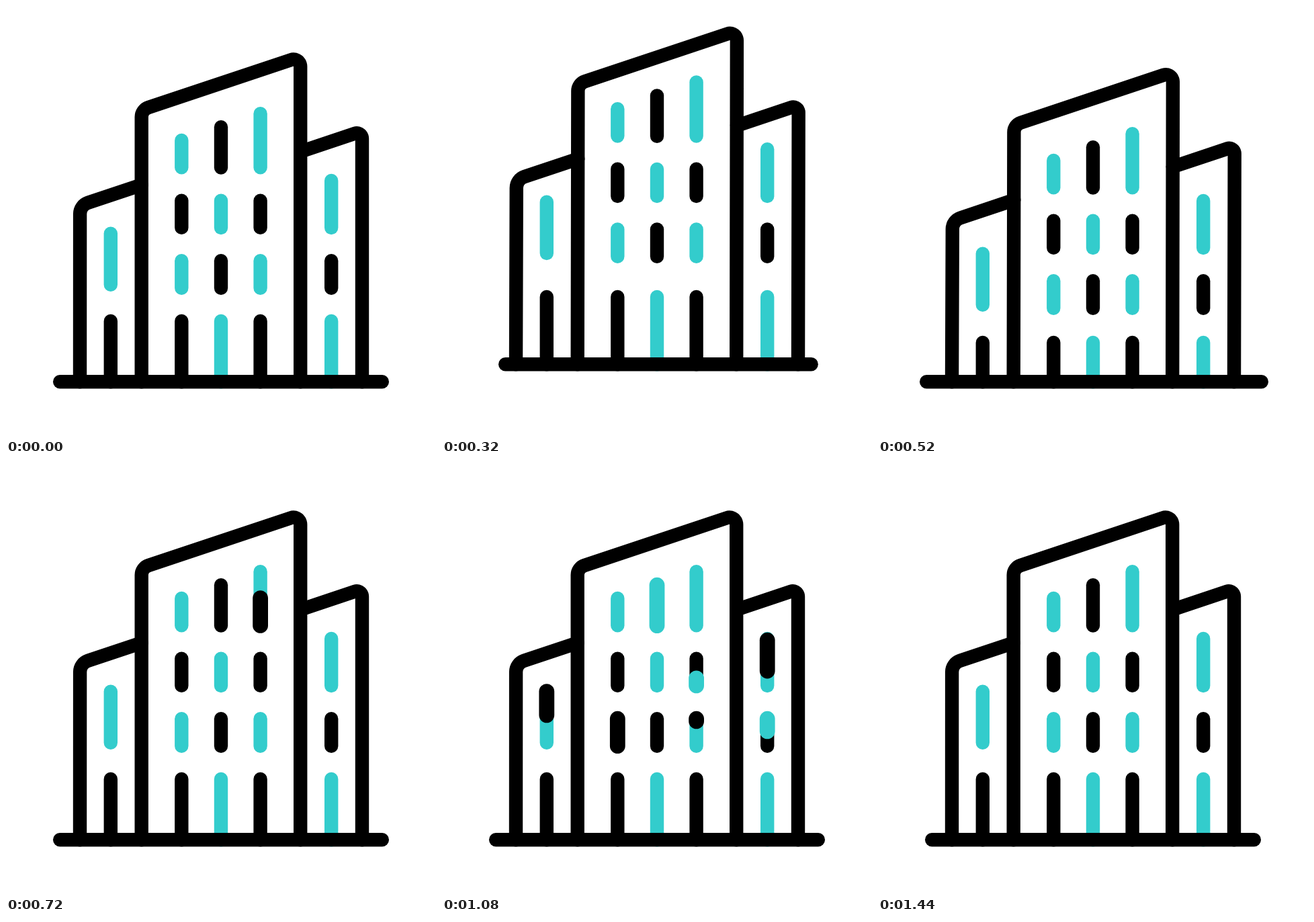
An HTML page with a canvas that plays this animation: 640 by 640 pixels, repeating every 1480 ms.

```html
<!DOCTYPE html>
<html lang="en">
<head>
<meta charset="utf-8">
<title>Office buildings</title>
<style>
  html, body { margin: 0; width: 100%; height: 100%; overflow: hidden; background: #fff; }
  canvas { display: block; width: 640px; height: 640px; }
</style>
</head>
<body>
<canvas id="stage" width="640" height="640"></canvas>
<script>
const LOOP = 1480, BLACK = '#000', TEAL = '#33cccc';
const LINE = 20.4, FLASH_LINE = 22.8;
const ctx = document.getElementById('stage').getContext('2d');

// Column centres, left to right
const [A, B, C, D, E] = [155.8, 261.3, 320, 378.6, 484.2];

// Windows: x, first and last centre y, colour
const windows = [
  [A, 338.6, 414.8, TEAL],
  [B, 200, 240.4, TEAL], [B, 289.6, 329.9, BLACK], [B, 379.2, 419.7, TEAL],
  [C, 180.2, 240.6, BLACK], [C, 289.8, 330, TEAL], [C, 379.2, 419.7, BLACK],
  [D, 160.2, 240.4, TEAL], [D, 289.6, 329.9, BLACK], [D, 379.2, 419.7, TEAL],
  [E, 260, 330, TEAL], [E, 379.2, 419.7, BLACK]
];
const doors = [[A, BLACK], [B, BLACK], [C, TEAL], [D, BLACK], [E, TEAL]];

// Colour swaps: x, from y, to y, colour, start time, delay of the wipe-out
const flashes = [
  [D, 240.4, 160.2, BLACK, 640, 230],
  [C, 240.6, 180.2, TEAL, 890, 230],
  [B, 419.7, 379.2, BLACK, 900, 230],
  [E, 330, 260, BLACK, 938, 87],
  [A, 338.6, 414.8, BLACK, 1005, 230],
  [E, 379.2, 419.7, TEAL, 1005, 230],
  [D, 329.9, 289.6, TEAL, 1026, 230],
  [D, 379.2, 419.7, BLACK, 1051, 230]
];

const mix = (a, b, p) => a + (b - a) * p;
const span = (t, from, length) => Math.min(1, Math.max(0, (t - from) / length));
const smooth = p => p * p * (3 - 2 * p);

// Jump: rise to peak, drop to low, settle at zero
function jump(t, peak, low, bend = 0.5) {
  if (t < 400) {
    const p = span(t, 80, 320);
    return peak * p * (1 + bend - bend * p);
  }
  if (t < 520) return mix(peak, low, smooth(span(t, 400, 120)));
  return mix(low, 0, smooth(span(t, 520, 120)));
}

function stroke(color, width = LINE) {
  ctx.strokeStyle = color;
  ctx.lineWidth = width;
  ctx.stroke();
}

function line(x1, y1, x2, y2, color, width) {
  ctx.beginPath();
  ctx.moveTo(x1, y1);
  ctx.lineTo(x2, y2);
  stroke(color, width);
}

function drawBuildings(dx, dy, ground) {
  const UP = Math.PI * 1.5, TILT = Math.atan2(0.3165, 0.9485);

  // Left
  ctx.beginPath();
  ctx.moveTo(110, ground);
  ctx.arc(127.8 + dx, 309.5 + dy, 17.7, Math.PI, UP - TILT);
  ctx.lineTo(201.7 + dx, 266.2 + dy);
  stroke(BLACK);

  // Right
  ctx.beginPath();
  ctx.moveTo(438.2 + dx, 216.8 + dy);
  ctx.arc(522 + dx, 197.2 + dy, 8, UP - TILT, 0);
  ctx.lineTo(530, ground);
  stroke(BLACK);

  // Middle
  ctx.beginPath();
  ctx.moveTo(201.7, ground);
  ctx.arc(216.8 + dx, 165.3 + dy, 15.1, Math.PI, UP - TILT);
  ctx.arc(427.7 + dx, 90.1 + dy, 10.5, UP - TILT, 0);
  ctx.lineTo(438.2, ground);
  stroke(BLACK);
}

function drawFlash([x, from, to, color, start, delay], t) {
  const head = smooth(span(t, start, 160));
  const tail = smooth(span(t, start + delay, 150));
  if (head > 0 && tail < 1) line(x, mix(from, to, tail), x, mix(from, to, head), color, FLASH_LINE);
}

function draw(t) {
  const ground = 559.3 + jump(t, -31.5, 0, 0.4);
  const lift = jump(t, -53.5, 30, 0.66);
  const doorTop = 469 + jump(t, -40, 32, 0.8);

  ctx.fillStyle = '#fff';
  ctx.fillRect(0, 0, 640, 640);
  ctx.lineCap = ctx.lineJoin = 'round';

  drawBuildings(jump(t, 0.8, 0.7), jump(t, -45.8, 22.6), ground);
  for (const [x, color] of doors) line(x, doorTop, x, ground, color);
  for (const [x, top, bottom, color] of windows) line(x, top + lift, x, bottom + lift, color);
  line(80.2 + jump(t, 16.6, -8), ground, 559.8 + jump(t, -12, 11), ground, BLACK);
  for (const flash of flashes) drawFlash(flash, t);
}

const began = performance.now();
function tick() {
  draw((performance.now() - began) % LOOP);
  requestAnimationFrame(tick);
}
tick();
</script>
</body>
</html>
```
